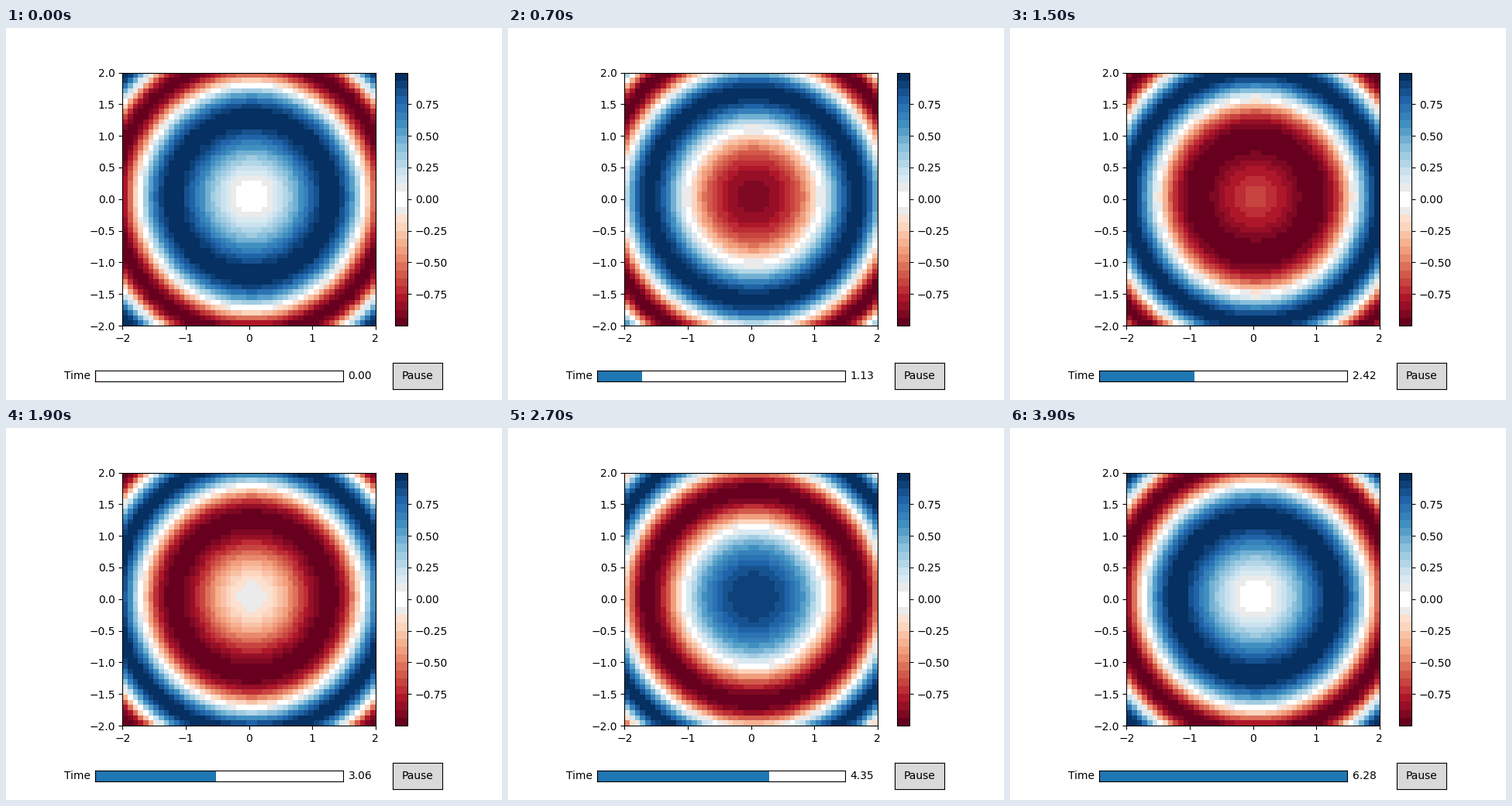
Animation, 640 px wide and 480 px high, one loop 4 s. Source, as a matplotlib script:

```python
import numpy as np
import matplotlib.pyplot as plt
from matplotlib.animation import FuncAnimation
from matplotlib.colors import ListedColormap

W, H = 640, 480
FRAMES, INTERVAL = 40, 100
LEVELS = 32

plt.rcParams["font.family"] = "DejaVu Sans"
plt.rcParams["font.size"] = 10

fig = plt.figure(figsize=(W / 100, H / 100), dpi=100, facecolor="white")


def stepped_map():
    """Red-white-blue map in flat bands with a pure white middle."""
    colors = plt.get_cmap("RdBu")(np.linspace(0, 1, LEVELS))
    mid = LEVELS // 2
    colors[mid - 2:mid + 2, :3] = 0.92
    colors[mid - 1:mid + 1, :3] = 1.0
    return ListedColormap(colors)


def bare_axes(rect, color):
    ax = fig.add_axes(rect, facecolor=color)
    ax.set(xticks=[], yticks=[], xlim=(0, 1), ylim=(0, 1))
    return ax


# Wave field: each cell takes the value at its lower left corner
grid = np.linspace(-2, 2, 50)
X, Y = np.meshgrid(grid, grid)
radius2 = (X**2 + Y**2)[:-1, :-1]
times = np.linspace(0, 2 * np.pi, FRAMES)


def wave(t):
    return np.sin(radius2 - t)


field = fig.add_axes([150.4 / W, 0.2, 326.4 / W, 0.68])
mesh = field.pcolormesh(X, Y, wave(0), cmap=stepped_map())
field.set(xlim=(-2, 2), ylim=(-2, 2),
          xticks=np.arange(-2, 3), yticks=np.linspace(-2, 2, 9))

bar_ax = fig.add_axes([501.6 / W, 0.2, 16.32 / W, 0.68])
fig.colorbar(mesh, cax=bar_ax, ticks=np.linspace(-0.75, 0.75, 7))

# Time slider
slider = bare_axes([0.18, 0.05, 0.5, 0.03], "white")
fill = plt.Rectangle((0, 0), 0, 1, facecolor="#1f77b4", linewidth=0)
slider.add_patch(fill)
slider.axvline(0, color="red", linewidth=1)
slider.text(-0.02, 0.5, "Time", ha="right", va="center")
value = slider.text(1.02, 0.5, "0.00", ha="left", va="center")

# Pause button
button = bare_axes([0.78, 0.03, 0.1, 0.07], "0.85")
button.text(0.5, 0.5, "Pause", ha="center", va="center")


def update(i):
    t = times[i]
    mesh.set_array(wave(t))
    fill.set_width(t / times[-1])
    value.set_text(f"{t:.2f}")
    return mesh, fill, value


anim = FuncAnimation(fig, update, frames=FRAMES, interval=INTERVAL,
                     repeat=True, repeat_delay=0, blit=False)
plt.show()
```
